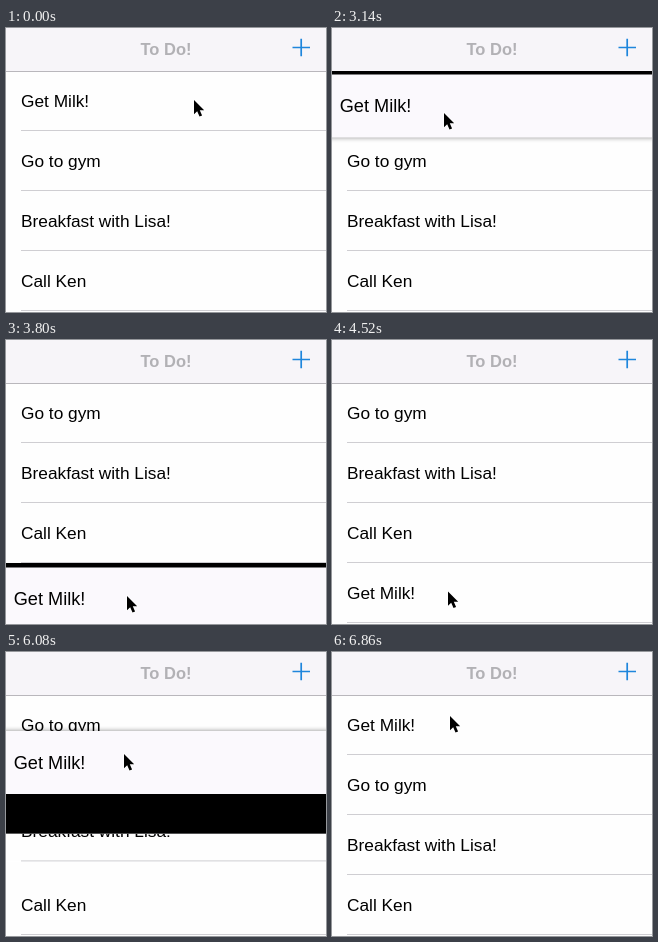
Animation, 320 px wide and 284 px high, one loop 7040 ms. Source, as an HTML page:

```html
<!DOCTYPE html>
<html lang="en">
<head>
<meta charset="utf-8">
<title>To Do!</title>
<style>
  html, body { margin: 0; width: 100%; height: 100%; overflow: hidden; background: #fefefe; }
  svg { display: block; width: 100%; height: 100%; }
  text { font: 17.3px "Liberation Sans", Arial, sans-serif; fill: #000; }
  .title { font-size: 16.5px; font-weight: bold; fill: #b2b1b5; text-anchor: middle; }
</style>
</head>
<body>
<svg viewBox="0 0 320 284" xmlns="http://www.w3.org/2000/svg">
  <defs>
    <clipPath id="list"><rect y="43" width="320" height="241"/></clipPath>
    <filter id="blur" x="-10%" y="-30%" width="120%" height="160%">
      <feGaussianBlur stdDeviation="2.4"/>
    </filter>
  </defs>
  <rect width="320" height="284" fill="#fefefe"/>
  <rect width="320" height="43" fill="#f7f5f9"/>
  <text class="title" x="160" y="27">To Do!</text>
  <path d="M286.5 19.5H304M295.2 10.8V28.2" stroke="#1f86dc" stroke-width="1.7"/>
  <g clip-path="url(#list)">
    <g id="rows"></g>
    <g id="lifted">
      <rect x="-5" y="-30" width="320" height="60" opacity=".45" filter="url(#blur)"/>
      <rect y="-30" width="320" height="60" fill="#fbf9fd"/>
      <text x="15" y="6">Get Milk!</text>
    </g>
  </g>
  <rect y="43" width="320" height="1" fill="#b9b7bc" id="rule"/>
  <path id="cursor" d="M0 0V14.2L3.2 11.2 5.5 16.6 8.1 15.5 5.8 10.2H10.2Z"
        stroke="#fff" stroke-width="1.6" paint-order="stroke" stroke-linejoin="round"/>
</svg>
<script>
const LOOP = 7040, STEP = 60, HOLD = 2000;
const TOP = 43, ROW = 60, SWAP = 240, HOLE_LAG = 15;

const $ = id => document.getElementById(id);
const clamp = v => Math.max(0, Math.min(1, v));
const mix = (a, b, p) => a + (b - a) * p;
const ease = p => { p = clamp(p); return p * p * (3 - 2 * p); };
const ramp = (t, start) => ease((t - start) / SWAP);

// pointer tip: time, x, y
const path = [
  [0, 188, 72], [1999, 188, 72], [2000, 171, 73], [2060, 147, 74], [2120, 122, 75], [2180, 112, 75],
  [3080, 112, 75], [3140, 112, 85], [3260, 114, 120], [3440, 118, 185], [3620, 120, 240], [3740, 121, 256],
  [4340, 121, 256], [4520, 116, 251.5],
  [5600, 116, 251.5], [5660, 115, 234], [5780, 115, 185], [5900, 116, 143], [6020, 118, 107.5],
  [6080, 118, 102], [6200, 118, 85], [6320, 118, 75],
  [6620, 118, 75], [6860, 118, 64], [LOOP, 118, 64]
];

// start times of each row's move up, then back down
const rows = [
  { label: 'Go to gym', up: 3200, down: 6110 },
  { label: 'Breakfast with Lisa!', up: 3370, down: 5914 },
  { label: 'Call Ken', up: 3540, down: 5720 }
];

const rowSvg = (label, extra = '') => `<g><rect width="320" height="60" fill="#fefefe"/>
  <rect x="15" y="59" width="305" height="1" fill="#cfced2"/>
  <text x="15" y="36">${label}</text>${extra}</g>`;

$('rows').innerHTML = rows.map(r => rowSvg(r.label)).join('') +
  rowSvg('Get Milk!', '<rect id="hole" width="320" height="60"/>');
const cells = [...$('rows').children];

function tip(t) {
  const i = Math.max(1, path.findIndex(k => k[0] >= t));
  const a = path[i - 1], b = path[i];
  const p = clamp((t - a[0]) / (b[0] - a[0]));
  return [mix(a[1], b[1], p), mix(a[2], b[2], p)];
}

const move = (el, x, y, s = 1) => el.setAttribute('transform', `translate(${x} ${y}) scale(${s})`);
const passed = (r, t) => ramp(t, r.up) - ramp(t, r.down);

function draw(time) {
  const t = time < HOLD ? 0 : HOLD + Math.floor((time - HOLD) / STEP) * STEP;

  rows.forEach((r, i) => move(cells[i], 0, TOP + ROW * (i + 1 - passed(r, t))));
  const slot = rows.reduce((sum, r) => sum + passed(r, t - HOLE_LAG), 0);
  const home = TOP + ROW * slot;
  move(cells[3], 0, home);

  const lift = ramp(t, 2360) - ramp(t, 4040) + ramp(t, 5240) - ramp(t, 6620);
  const held = t < 4040 || t > 5240;
  const follow = held ? Math.max(78, Math.min(259, tip(t - STEP)[1] + 3)) : 259;
  const scale = mix(1, 1.05, lift);
  move($('lifted'), 160 * (1 - scale), mix(home + ROW / 2, follow, lift), scale);
  $('lifted').setAttribute('opacity', lift);
  $('hole').setAttribute('opacity', lift);
  $('rule').setAttribute('opacity', slot < 0.5 ? 1 - lift : 1);

  move($('cursor'), ...tip(t));
}

const start = performance.now();
function tick(now) {
  draw(Math.max(0, now - start) % LOOP);
  requestAnimationFrame(tick);
}
draw(0);
requestAnimationFrame(tick);
</script>
</body>
</html>
```
